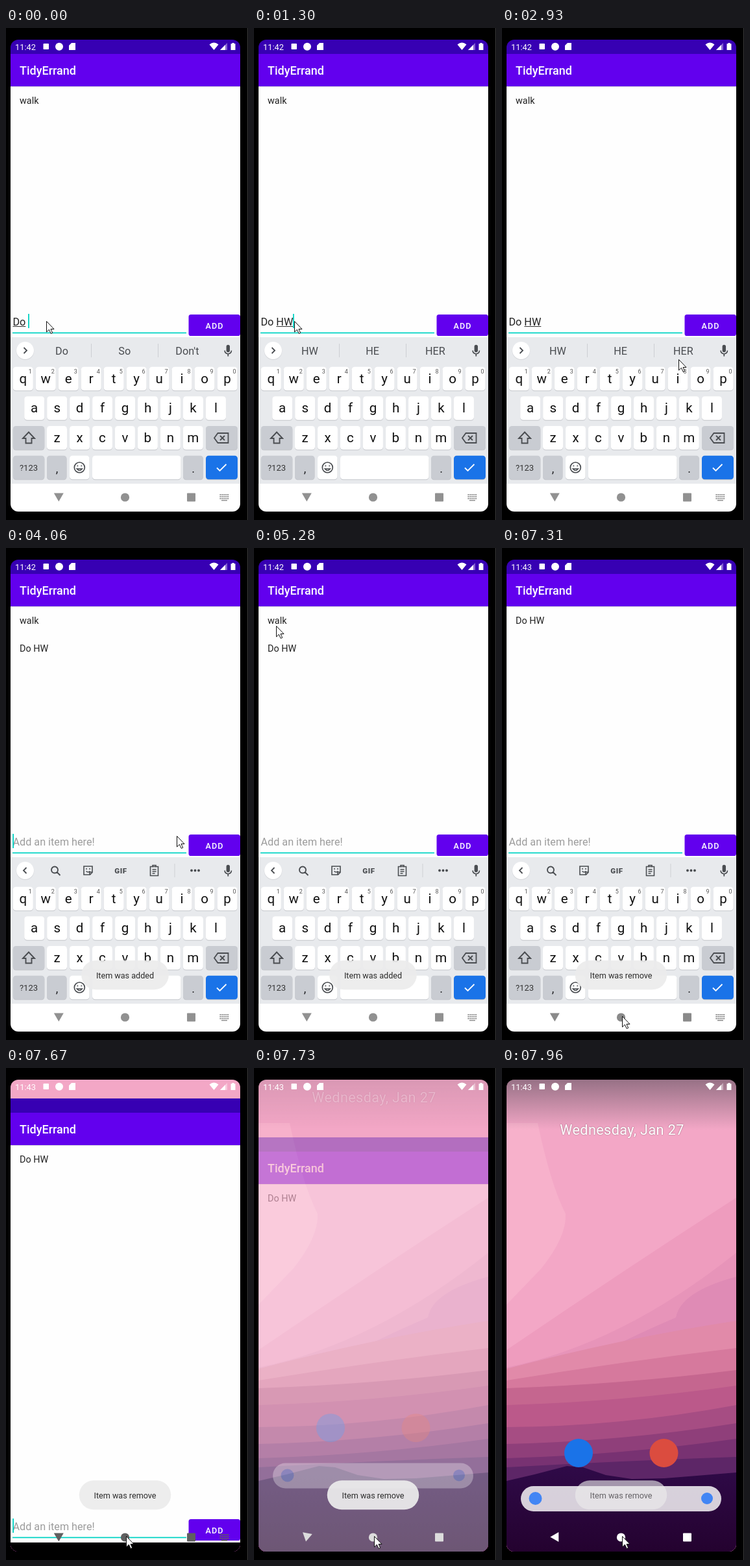
Recreate the animation shown at these times as an HTML page with a canvas. Size 373 by 759 pixels, loop 8 s.

```html
<!DOCTYPE html>
<html lang="en">
<head>
<meta charset="utf-8">
<title>To-do list demo</title>
<style>
  html, body { margin: 0; width: 100%; height: 100%; overflow: hidden; background: #000; }
  canvas { display: block; }
</style>
</head>
<body>
<canvas width="373" height="759"></canvas>
<script>
const stage = document.querySelector('canvas'), layer = stage.cloneNode();
let c = stage.getContext('2d');
const LOOP = 8000, TEAL = '#00d3c4', INK = '#202124';
const clamp = v => Math.max(0, Math.min(1, v));
const ramp = (t, from, to) => clamp((t - from) / (to - from));

function box(x, y, w, h, color, r = 0) {
  c.fillStyle = color;
  c.beginPath();
  c.roundRect(x, y, w, h, r);
  c.fill();
}
function dot(x, y, r, color) {
  c.fillStyle = color;
  c.beginPath();
  c.arc(x, y, r, 0, 7);
  c.fill();
}
function text(str, x, y, size, color = INK, align = 'left', weight = 400, spacing = 0) {
  c.font = `${weight} ${size}px Roboto, sans-serif`;
  c.letterSpacing = spacing + 'px';
  c.textAlign = align;
  c.fillStyle = color;
  c.fillText(str, x, y);
}
function icon(path, x, y, color, line = 0, turn = 0) {
  c.save();
  c.translate(x, y);
  c.rotate(turn);
  c.fillStyle = c.strokeStyle = color;
  c.lineWidth = line;
  const p = new Path2D(path);
  line ? c.stroke(p) : c.fill(p);
  c.restore();
}
// Draws a flattened group, so that overlapping parts fade as one.
function group(alpha, dy, draw) {
  if (alpha <= 0) return;
  if (alpha === 1) {
    c.save();
    c.translate(0, dy);
    draw();
    c.restore();
    return;
  }
  const target = c;
  c = layer.getContext('2d');
  c.clearRect(0, 0, 373, 759);
  group(1, dy, draw);
  c = target;
  c.globalAlpha = alpha;
  c.drawImage(layer, 0, 0);
  c.globalAlpha = 1;
}

const ICONS = {
  search: 'M3.5-1.5A5 5 0 1 1-6.5-1.5A5 5 0 1 1 3.5-1.5M2 2L7 7',
  sticker: 'M-6.5-6.5H6.5V3L3 6.5H-6.5ZM6.5 2.5H2.5V6.5M-3.5-2.5H-1.5M3.5-2.5H1.5M-3 1Q0 4 3 1',
  clipboard: 'M-6-6H6V8H-6ZM-2.5-5V-8H2.5V-5M-3-1.5H3M-3 1.5H3M-3 4.5H1',
  mic: 'M-2.7-6A2.7 2.7 0 0 1 2.7-6V0A2.7 2.7 0 0 1-2.7 0ZM-6 0H-4.4A4.4 4.4 0 0 0 4.4 0H6A6 6 0 0 1 .9 5.8V9H-.9V5.8A6 6 0 0 1-6 0Z',
  shift: 'M0-9L-9 .5H-4.5V8H4.5V.5H9Z',
  backspace: 'M-11 0L-5.5-7.5H10.5V7.5H-5.5ZM-2-3.5L5 3.5M5-3.5L-2 3.5',
  smile: 'M8 0A8 8 0 1 1-8 0A8 8 0 1 1 8 0M-4-2.5H-2M2-2.5H4M-4 2Q0 7 4 2Z',
  check: 'M-7 0L-2.5 4.5L7.5-5.5',
  chevron: 'M-2-4.5L2.5 0L-2 4.5',
  pointer: 'M0 0V16.5L3.9 12.8L6.7 18.9L9.2 17.8L6.5 12H11.5Z',
};

// Mouse: time, x, y
const MOUSE = [
  [0, 62, 452], [2430, 62, 452], [2600, 120, 490], [2780, 215, 526], [2930, 272, 511],
  [3100, 296, 475], [3230, 300, 454], [3940, 300, 454], [4060, 263, 444], [4200, 225, 490],
  [4350, 194, 534], [4600, 135, 350], [4850, 65, 190], [5100, 34, 130], [5215, 34, 130],
  [5310, 34, 116], [6335, 34, 116], [6460, 80, 235], [6600, 122, 369], [6800, 160, 560],
  [7000, 182, 690], [7130, 185, 722], [LOOP, 185, 722],
];
function drawMouse(t) {
  const i = MOUSE.findIndex(p => p[0] > t);
  const [t0, x0, y0] = MOUSE[i - 1], [t1, x1, y1] = MOUSE[i], k = ramp(t, t0, t1);
  const x = Math.round(x0 + (x1 - x0) * k) + .5, y = Math.round(y0 + (y1 - y0) * k) + .5;
  icon(ICONS.pointer, x, y, '#fff');
  icon(ICONS.pointer, x, y, '#111', 1);
}

// Wallpaper bands: left, middle and right height, colour
const BANDS = [
  [435, 316, 200, '#ee9cbe'], [462, 400, 285, '#e794b9'], [464, 422, 390, '#e18aa9'],
  [482, 455, 432, '#d6799d'], [494, 484, 466, '#c5668f'], [520, 510, 490, '#bb598a'],
  [554, 545, 520, '#a64d83'], [580, 570, 548, '#8f3f7a'], [602, 592, 572, '#783272'],
  [616, 607, 600, '#5d2667'],
];
function drawWallpaper(t) {
  box(7, 18, 354, 728, '#f3a7c6');
  icon('M7 85H55Q75 180 98 225Q100 260 60 310L7 365Z', 0, 0, '#f7b1cb');
  BANDS.forEach(([l, m, r, color], i) => {
    icon(`M7 ${l}Q184 ${2 * m - (l + r) / 2} 361 ${r}V746H7Z`, 0, 0, color);
    if (i === 1) icon('M361 322Q275 345 268 385Q220 405 150 440H361Z', 0, 0, '#df8bb5');
  });
  const night = c.createLinearGradient(0, 615, 0, 746);
  night.addColorStop(0, '#2f0a48');
  night.addColorStop(1, '#24022f');
  icon('M7 637L50 627L100 614L125 616L160 628L200 634L250 633L300 629L361 624V746H7Z', 0, 0, night);
  const shade = c.createLinearGradient(0, 18, 0, 95);
  shade.addColorStop(0, 'rgba(60,60,70,.5)');
  shade.addColorStop(1, 'rgba(60,60,70,0)');
  group(ramp(t, 7670, 7900), 0, () => box(7, 18, 354, 80, shade));
}

function drawHome(t) {
  const alpha = ramp(t, 7690, 7800), slide = (1 - ramp(t, 7690, 7920)) ** 3;
  group(ramp(t, 7690, 7850), -91 * slide, () => {
    c.shadowColor = 'rgba(0,0,0,.4)';
    c.shadowBlur = 2;
    text('Wednesday, Jan 27', 185, 103, 21.6, '#fff', 'center', 400, .4);
  });
  group(alpha, -70 * slide, () => {
    dot(118, 594, 22, '#1a73e8');
    dot(249.5, 594, 22, '#db4c3f');
  });
  group(alpha, -64 * slide, () => {
    box(29, 645, 309, 39, 'rgba(255,255,255,.81)', 19.5);
    dot(51.5, 664, 10, '#4285f4');
    dot(316, 664, 9, '#4285f4');
  });
}

function inputState(t) {
  if (t < 220) return { value: 'Do ', marked: [0, 2], words: ['Do', 'So', "Don't"] };
  if (t < 960) return { value: 'Do ', words: ['you', 'not', 'I'] };
  const value = t < 1060 ? 'Do H' : 'Do HW';
  if (t < 1300) return { value, marked: [3, 4], words: ['H', 'Have', 'He'] };
  if (t < 3560) return { value, marked: [3, 5], words: ['HW', 'HE', 'HER'] };
  return { value: '' };
}
function caretOn(t) {
  if (t < 900) return t < 710;
  if (t < 3560) return t < 1790 || (t >= 2290 && t < 2780) || t >= 3225;
  return Math.max(0, t - 3580) % 975 < 488;
}

function drawInput(t, { value, marked }) {
  const left = 10.5;
  text(value || 'Add an item here!', left, 458.5, 16.2, value ? '#222' : '#9c9c9c');
  const widthOf = n => c.measureText(value.slice(0, n)).width;
  if (marked) {
    const from = widthOf(marked[0]);
    box(left + from, 460, widthOf(marked[1]) - from, 1, '#333');
  }
  if (caretOn(t)) box(left + widthOf(value.length) - .3, 441, 1.8, 22, TEAL);
  box(10, 469.5, 268, 1.8, TEAL);
  box(281.5, 442, 79.5, 33, '#6200ee', 3.6);
  const press = ramp(t, 3540, 3640) * (1 - ramp(t, 3700, 3950));
  box(281.5, 442, 79.5, 33, `rgba(255,255,255,${.24 * press})`, 3.6);
  text('ADD', 321.6, 463.5, 12.6, '#fff', 'center', 500, 1.15);
}

function drawApp(t, input, keyboard) {
  box(7, 18, 354, 22, '#3700b3');
  box(7, 40, 354, 50, '#6200ee');
  box(7, 90, 354, 613, '#fefefe');
  box(7, 90, 354, 1, '#ddd');
  box(7, 703, 354, 43, keyboard ? '#fff' : '#000');
  text('TidyErrand', 21, 72, 18, '#fff', 'left', 500);
  const items = t < 3580 ? ['walk'] : t < 5830 ? ['walk', 'Do HW'] : ['Do HW'];
  items.forEach((item, i) => text(item, 21, 117 + i * 43.3, 14.4, '#222'));
  group(1, keyboard ? 0 : 225, () => drawInput(t, input));
  if (keyboard) drawKeyboard(t, input.words);
}

function key(x, y, w, color = '#fff') {
  box(x, y + 1, w, 36.5, '#c3c5ca', 4.5);
  box(x, y, w, 36.5, color, 4.5);
}
function letterRow(letters, x, y, hints) {
  [...letters].forEach((ch, i) => {
    const left = x + i * 34.97;
    key(left, y, 31);
    text(ch, left + 15.5, y + 25, 20.5, '#111', 'center');
    if (hints) text((i + 1) % 10, left + 26.5, y + 10, 9, '#555', 'center');
  });
}
function drawKeyboard(t, words) {
  const grey = '#c9ccd2', dark = '#4a4d51';
  box(7, 477, 354, 226, '#e8eaed');
  dot(29.5, 498.3, 13.8, '#d3d5d9');
  dot(29.5, 497.5, 13.5, '#fff');
  icon(ICONS.chevron, 29.5, 497.5, dark, 1.8, words ? 0 : Math.PI);
  if (words) {
    words.forEach((w, i) => text(w, 86 + i * 96.7, 504, 16.2, dark, 'center'));
    for (const x of [131, 234]) box(x, 487, 1, 21, '#cdcfd3');
  } else {
    icon(ICONS.search, 76.5, 498, dark, 1.9);
    icon(ICONS.sticker, 126.5, 497.5, dark, 1.6);
    text('GIF', 177, 501.5, 11.5, dark, 'center', 900, .6);
    icon(ICONS.clipboard, 228.5, 497.5, dark, 1.6);
    box(259.5, 487, 1, 21, '#cdcfd3');
    for (const x of [286, 291.5, 297]) dot(x, 497.5, 1.9, dark);
  }
  icon(ICONS.mic, 342.3, 497.5, dark);

  const upper = t >= 900 && t < 1110;
  const rows = ['qwertyuiop', 'asdfghjkl', 'zxcvbnm'].map(r => upper ? r.toUpperCase() : r);
  letterRow(rows[0], 10.8, 522.7, true);
  letterRow(rows[1], 28.2, 568.3);
  letterRow(rows[2], 63, 614);
  key(10.8, 614, 48.5, grey);
  icon(ICONS.shift, 35, 632.5, dark, upper ? 0 : 1.9);
  key(308, 614, 49, grey);
  icon(ICONS.backspace, 332, 632.5, dark, 1.8);

  key(10.8, 659.7, 48.5, grey);
  text('?123', 35, 683, 13, '#333', 'center');
  key(63, 659.7, 30.5, grey);
  text(',', 78.5, 686, 18, INK, 'center');
  key(98, 659.7, 30.5);
  icon(ICONS.smile, 113.3, 678, dark, 1.7);
  key(133, 659.7, 136.5);
  key(273, 659.7, 31, grey);
  text('.', 288.5, 686, 18, INK, 'center');
  key(308, 659.7, 49, '#1a73e8');
  icon(ICONS.check, 332, 678.5, '#fff', 1.8);
}

function drawStatus(t) {
  text(t < 6000 ? '11:42' : '11:43', 14, 33.5, 12.8, '#fff');
  box(57.5, 24, 8.5, 9, '#fff', 1);
  dot(82, 28.7, 6, '#fff');
  icon('M97 27L101 23H107V34H97Z', 0, 0, '#fff');
  icon('M313.5 25.5Q320.5 19.5 327.5 25.5L320.5 34Z', 0, 0, '#fff');
  icon('M341 23V34H330Z', 0, 0, 'rgba(255,255,255,.4)');
  icon('M338 26V34H330Z', 0, 0, '#fff');
  icon('M346.5 24.2H348.5V23H351.5V24.2H353.5V34H346.5Z', 0, 0, '#fff');
}

function drawNav(t) {
  const level = t < 7700 ? 145 - 50 * ramp(t, 7280, 7490) : 215 + 40 * ramp(t, 7715, 7850);
  const color = `rgb(${level},${level},${level})`;
  icon('M-7.5-6H7.5L0 7Z', 81.3, 723.5, color, 0, Math.PI / 2 * ramp(t, 7715, 7850));
  dot(183.5, 724, 6.6, color);
  box(279, 717.5, 13, 13, color, 1);
  if (t >= 7700) return;
  for (let y = 719; y < 726; y += 3)
    for (let x = 329.5; x < 343; x += 2.9) box(x, y, 1.9, 1.9, color);
  box(332, 728, 9, 1.6, color);
}

function drawToast(t, message, start, end, fade) {
  group(ramp(t, start, start + 250) * (1 - ramp(t, end, end + fade)), 0, () => {
    c.font = '400 12.6px Roboto, sans-serif';
    c.letterSpacing = '0px';
    const w = c.measureText(message).width + 45.5;
    box(183.5 - w / 2, 636.3, w, 44.9, 'rgba(236,236,236,.93)', 22.4);
    text(message, 183.5, 664, 12.6, '#2b2b2b', 'center');
  });
}

function drawScene(t) {
  box(0, 0, 373, 759, '#000');
  box(372, 0, 1, 759, '#3a3a3a');
  c.save();
  c.beginPath();
  c.roundRect(7, 18, 354, 728, 12);
  c.clip();
  const leaving = t >= 7640;
  if (leaving) {
    drawWallpaper(t);
    drawHome(t);
  }
  group(1 - ramp(t, 7680, 7757), leaving ? Math.round(t - 7642.5) : 0,
    () => drawApp(t, inputState(t), !leaving));
  drawStatus(t);
  drawNav(t);
  drawToast(t, 'Item was added', 3640, 5640, 160);
  drawToast(t, 'Item was remove', 5880, 7830, 400);
  c.restore();
  drawMouse(t);
}

const start = performance.now();
function tick() {
  drawScene((performance.now() - start) % LOOP);
  requestAnimationFrame(tick);
}
tick();
</script>
</body>
</html>
```
